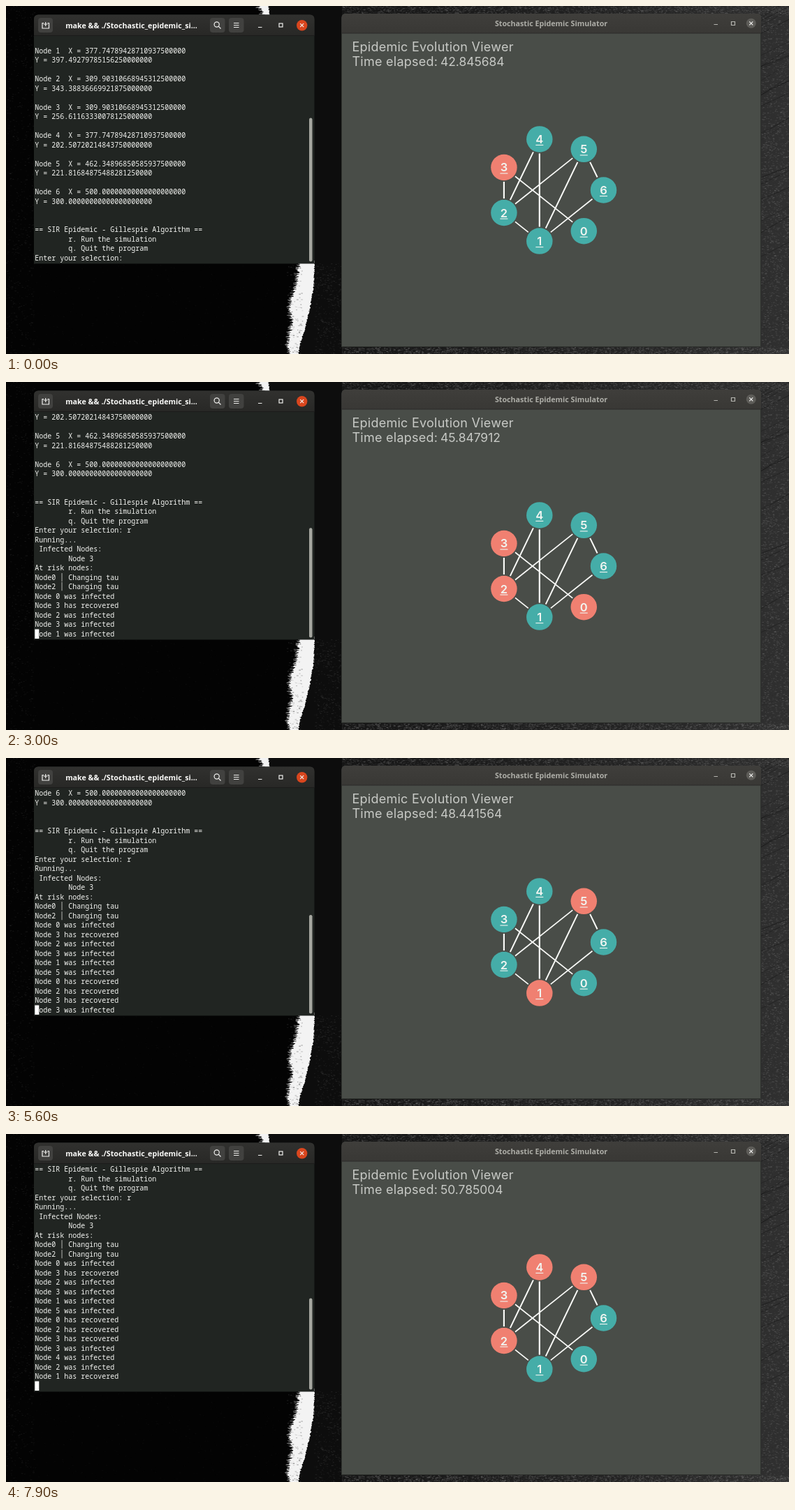
Recreate the animation shown at these times as an HTML page with a canvas. Size 1121x499 px, loop 8000 ms.

```html
<!DOCTYPE html>
<html lang="en">
<head>
<meta charset="utf-8">
<title>Stochastic Epidemic Simulator</title>
<style>
  html, body { margin: 0; width: 100%; height: 100%; overflow: hidden; background: #030303; }
  canvas, svg { position: absolute; left: 0; top: 0; display: block; }
  text { white-space: pre; }
  .term { font: 10px "Noto Sans Mono", monospace; fill: #f2f3f0; }
  .title { font: 700 10.7px "Open Sans", sans-serif; text-anchor: middle; }
  .info { font: 18px Inter, sans-serif; letter-spacing: .25px; fill: #c8cac6; }
  .clock { font-size: 17.4px; letter-spacing: 0; }
  .label { font: 600 16.5px Inter, sans-serif; text-anchor: middle; fill: #f1f5f1; }
  .icon { fill: none; stroke: #f0f0ee; stroke-width: 1.2; }
  .dim { stroke: #b5b5b0; }
</style>
</head>
<body>
<canvas id="wall" width="1121" height="499"></canvas>
<svg width="1121" height="499" viewBox="0 0 1121 499">
  <defs>
    <linearGradient id="bar" x2="0" y2="1"><stop stop-color="#31312f"/><stop offset="1" stop-color="#282826"/></linearGradient>
    <linearGradient id="bar2" x2="0" y2="1"><stop stop-color="#3f3e3b"/><stop offset="1" stop-color="#393835"/></linearGradient>
    <clipPath id="screen"><rect x="40" y="43" width="394" height="325.5"/></clipPath>
  </defs>

  <g id="terminal">
    <path d="M40 369.500V19q0-6.500 6.500-6.500H435q6.500 0 6.500 6.500V369.500z" fill="#212522"/>
    <path d="M40 42.500V19q0-6.500 6.500-6.500H435q6.500 0 6.500 6.500V42.500z" fill="url(#bar)"/>
    <path d="M40 42.500H441.500" stroke="#1b1b1a"/>
    <g fill="#41413f">
      <rect x="46" y="17" width="21" height="21" rx="4"/>
      <rect x="292" y="17" width="21.500" height="21" rx="4"/>
      <rect x="319" y="17" width="21.500" height="21" rx="4"/>
    </g>
    <g class="icon">
      <path d="M54 24.500h-2v7.500h9.500v-7.500h-2M56.700 23v6M53.700 26h6"/>
      <circle cx="301.700" cy="26.500" r="3.600"/><path d="M304.300 29.200l3.200 3.300"/>
      <path d="M326 24.500h7.500M326 27.500h7.500M326 30.500h7.500M361 30.500h5.500"/>
      <rect x="391" y="25" width="5" height="5"/>
    </g>
    <circle cx="423.700" cy="27.700" r="7.700" fill="#d9461e"/>
    <path class="icon" d="M421.200 25.200l5 5m0-5l-5 5"/>
    <text class="title" x="179.500" y="31.500" fill="#fafaf8">make &amp;&amp; ./Stochastic_epidemic_si...</text>
    <g clip-path="url(#screen)"><g id="log" class="term"></g></g>
    <rect id="cursor" y="354.500" width="6" height="13.500" fill="#fff"/>
    <rect id="thumb" x="434" width="4.500" rx="2.200" fill="#a5a69f"/>
  </g>

  <g id="viewer">
    <path d="M480.500 489V17q0-6 6-6H1075q6 0 6 6V489z" fill="#494d48"/>
    <path d="M480.500 39V17q0-6 6-6H1075q6 0 6 6V39z" fill="url(#bar2)"/>
    <path d="M480.500 39H1081" stroke="#2b2b29"/>
    <path d="M480.500 39V488.500H1080.500V39" fill="none" stroke="#2f322e"/>
    <text class="title" x="780.500" y="29" fill="#adada7">Stochastic Epidemic Simulator</text>
    <path class="icon dim" d="M1013.500 26.500h5.500M1038.500 22.500h5v5h-5z"/>
    <circle cx="1066.800" cy="24.800" r="7" fill="#5d5c58"/>
    <path class="icon" d="M1064.300 22.300l5 5m0-5l-5 5"/>
    <text class="info" x="495.500" y="65">Epidemic Evolution Viewer</text>
    <text class="info" x="495.500" y="86">Time elapsed:</text>
    <text class="info clock" id="clock" x="622" y="86"></text>
    <g id="edges" stroke="#fafbf8"></g>
    <g id="nodes"></g>
  </g>
</svg>
<script>
const LOOP = 8000, STEP = 100, ROW = 13.5, LAST_ROW = 23;
const HEALTHY = '#45ada8', INFECTED = '#f08071';
const $ = id => document.getElementById(id);

function add(parent, tag, attrs, text = '') {
  const el = document.createElementNS('http://www.w3.org/2000/svg', tag);
  for (const key in attrs) el.setAttribute(key, attrs[key]);
  el.textContent = text;
  parent.appendChild(el);
  return el;
}

// Each event: time of the colour change, node, infected or not, time of its log line.
const START = 1500, TYPED = 1300;
const events = [
  [1500, 0, true], [1900, 3, false], [2400, 2, true], [2900, 3, true],
  [3400, 1, true], [4100, 5, true], [4400, 0, false], [4900, 2, false, 5100],
  [5300, 3, false], [5800, 3, true], [6800, 4, true], [7200, 2, true], [7600, 1, false]
].map(([at, node, infected, logAt = at]) => ({ at, node, infected, logAt }));

const clockKeys = [
  [0, 42.845684], [2000, 44.847076], [3000, 45.847912], [3900, 46.765305],
  [5000, 47.866138], [6200, 49.016991], [7900, 50.785004]
];

// Terminal contents
const coords = [
  [377.747894287109375, 397.4927978515625], [309.903106689453125, 343.38836669921875],
  [309.903106689453125, 256.61163330078125], [377.747894287109375, 202.5072021484375],
  [462.348968505859375, 221.8168487548828125], [500, 300]
];
const lines = [
  ...coords.flatMap(([x, y], i) => ['', `Node ${i + 1}  X = ${x.toFixed(20)}`, `Y = ${y.toFixed(20)}`]),
  '', '',
  '== SIR Epidemic - Gillespie Algorithm ==',
  '        r. Run the simulation',
  '        q. Quit the program',
  'Enter your selection: ',
  'Running...', ' Infected Nodes:', '        Node 3', 'At risk nodes:',
  'Node0 │ Changing tau', 'Node2 │ Changing tau',
  ...events.map(e => `Node ${e.node} ${e.infected ? 'was infected' : 'has recovered'}`)
];
const rows = lines.map((line, i) => add($('log'), 'text', { x: 41.3, y: 54 + ROW * i }, line));
const prompt = rows[LAST_ROW];

// Graph
const points = Array.from({ length: 7 }, (_, i) => {
  const a = 2 * Math.PI * (i + 1) / 7;
  return [780.5 + 75 * Math.cos(a), 264 + 75 * Math.sin(a)];
});
for (const [a, b] of ['32', '42', '41', '52', '51', '56', '30', '61', '21']) {
  const [x1, y1] = points[a], [x2, y2] = points[b];
  const dx = x2 - x1, dy = y2 - y1, len = Math.hypot(dx, dy);
  const ux = dx / len * 20.5, uy = dy / len * 20.5;
  add($('edges'), 'line', {
    x1: x1 + ux, y1: y1 + uy, x2: x2 - ux, y2: y2 - uy,
    'stroke-width': 2.2 * Math.max(Math.abs(dx), Math.abs(dy)) / len
  });
}
const discs = points.map(([x, y], i) => {
  const disc = add($('nodes'), 'circle', { cx: x, cy: y, r: 18.75 });
  add($('nodes'), 'text', { class: 'label', x, y: y + 6 }, i);
  add($('nodes'), 'rect', { x: x - 5.5, y: y + 8, width: 11, height: 1.1, fill: '#f1f5f1' });
  return disc;
});

function paintWall() {
  const c = $('wall').getContext('2d');
  let seed = 7;
  const rnd = () => (seed = (seed * 16807) % 2147483647) / 2147483647;
  const fill = (style, x, y, w, h) => { c.fillStyle = style; c.fillRect(x, y, w, h); };
  const grain = (n, x, y, w, h, tone, alpha) => {
    for (let i = 0; i < n; i++)
      fill(`rgba(${tone},${tone},${tone},${rnd() * alpha})`, x + rnd() * w, y + rnd() * h, 1 + rnd() * 2, 1);
  };
  fill('#030303', 0, 0, 1121, 499);
  const paper = c.createLinearGradient(376, 0, 1121, 0);
  paper.addColorStop(0, '#070707');
  paper.addColorStop(.14, '#151515');
  paper.addColorStop(.7, '#242424');
  paper.addColorStop(1, '#303030');
  fill(paper, 376, 0, 745, 13);
  fill(paper, 441, 0, 680, 499);
  grain(900, 0, 0, 40, 499, 90, .2);
  grain(500, 40, 370, 360, 129, 70, .12);
  grain(1600, 441, 0, 40, 499, 130, .22);
  grain(2500, 441, 0, 680, 11, 150, .25);
  grain(2500, 1081, 0, 40, 499, 150, .28);
  grain(2500, 441, 489, 680, 10, 150, .3);
  c.lineWidth = 1;
  for (let i = 0; i < 35; i++) {
    const y = rnd() * 499;
    c.strokeStyle = `rgba(0,0,0,${rnd() * .35})`;
    c.beginPath();
    c.moveTo(1081, y);
    c.lineTo(1121, y - 15 - rnd() * 12);
    c.stroke();
  }

  // Torn edge: a row-by-row strip between two polylines with jittered borders.
  const along = (pts, y) => {
    const k = Math.max(1, pts.findIndex(p => p[0] >= y));
    const [y0, x0] = pts[k - 1], [y1, x1] = pts[k];
    return x0 + (x1 - x0) * (y - y0) / (y1 - y0);
  };
  const left = [[0, 360], [13, 368], [369, 418], [395, 415], [430, 404], [455, 408], [480, 402], [499, 404]];
  const right = [[0, 375], [13, 377], [369, 441], [400, 440], [430, 435], [460, 428], [485, 420], [499, 418]];
  for (let y = 0; y < 499; y++) {
    const l = along(left, y) + rnd() * 4, r = along(right, y) + rnd() * 1.5;
    fill('#0d0d0d', r, y, 481 - r, 1);
    fill('#6a6a6a', l - rnd() * 5, y, 6, 1);
    fill('#f3f3f3', l, y, r - l, 1);
  }
  grain(160, 402, 370, 22, 129, 60, .6);
  grain(500, 441, 369, 40, 130, 130, .2);
}

function elapsed(t) {
  let k = clockKeys.findIndex(key => key[0] >= t);
  if (k < 1) k = 1;
  const [t0, v0] = clockKeys[k - 1], [t1, v1] = clockKeys[k];
  return v0 + (v1 - v0) * (t - t0) / (t1 - t0);
}

function draw(now) {
  const t = Math.floor(now % LOOP / STEP) * STEP;
  const typed = t >= TYPED, running = t >= START;
  const scroll = running ? 7 + events.filter(e => e.logAt <= t).length : 0;

  $('clock').textContent = elapsed(t).toFixed(6);
  $('log').setAttribute('transform', `translate(0 ${-ROW * scroll})`);
  prompt.textContent = lines[LAST_ROW] + (typed ? 'r' : '');

  const height = 8265 / (38 + scroll) - 11.5;
  $('thumb').setAttribute('y', 366.5 - height);
  $('thumb').setAttribute('height', height);

  const phase = t % 1200;
  const lit = (phase >= 300 && phase < 900) || (typed && !running);
  $('cursor').setAttribute('x', running ? 41.3 : typed ? 179.3 : 173.3);
  $('cursor').setAttribute('visibility', lit ? 'visible' : 'hidden');

  const sick = points.map((_, i) => i === 3);
  for (const e of events) if (e.at <= t) sick[e.node] = e.infected;
  discs.forEach((disc, i) => disc.setAttribute('fill', sick[i] ? INFECTED : HEALTHY));
}

function tick() {
  draw(performance.now());
  requestAnimationFrame(tick);
}
paintWall();
tick();
</script>
</body>
</html>
```
